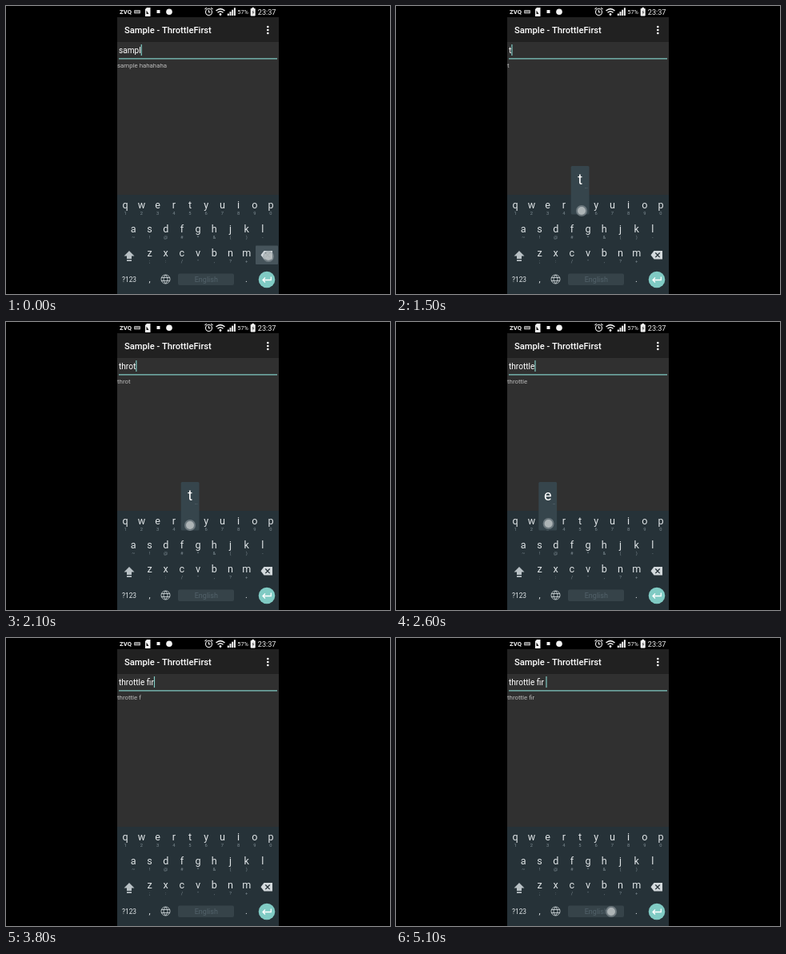
Write an HTML page with a canvas that moves like this. It is 480x360 px and loops after 5200 ms.

```html
<!DOCTYPE html>
<html lang="en">
<head>
<meta charset="utf-8">
<title>Throttled typing</title>
<style>
  html, body { margin: 0; width: 100%; height: 100%; overflow: hidden; background: #000; }
  canvas { display: block; }
</style>
</head>
<body>
<canvas id="stage" width="480" height="360"></canvas>
<script>
const ctx = document.getElementById('stage').getContext('2d');
const LOOP = 5200, STEP = 100, WINDOW = 500;
const TEAL = '#80cbc4', KEY = '#dfe4e6', HINT = '#7f8d94';

// [time, typed character, finger offset x, y]; '<' deletes
const edits = [
  [100, '<'], [200, '<'], [300, '<'], [400, '<'], [500, '<'],
  [1500, 't', 2, 7], [1700, 'h', 0, 5], [1800, 'r', 1, 5], [1900, 'o', 0, 5],
  [2100, 't', 0, 5], [2300, 't', 1, 5], [2400, 'l', -1, 5], [2600, 'e', 1, 3],
  [2900, ' ', 19, 0], [3300, 'f', -2, 5], [3500, 'i', 0, 5], [3700, 'r', 1, 5],
  [5100, ' ', 19, 0]
];

const keys = {};
[['qwertyuiop', '1234567890', 149.2, 249],
 ['asdfghjkl', '~!@#*&()-', 159.3, 279],
 ['zxcvbnm', ';:/",?+', 179.5, 309]].forEach(([letters, hints, x0, y]) =>
  [...letters].forEach((c, i) => keys[c] = { x: x0 + 20.2 * i, y, hint: hints[i] }));

function rect(x, y, w, h, color, radius = 0) {
  ctx.fillStyle = color;
  ctx.beginPath();
  ctx.roundRect(x, y, w, h, radius);
  ctx.fill();
}

function circle(x, y, r, color) {
  ctx.fillStyle = color;
  ctx.beginPath();
  ctx.arc(x, y, r, 0, 7);
  ctx.fill();
}

function text(s, x, y, size, color, align = 'left', weight = 400) {
  ctx.font = `${weight} ${size}px Roboto, sans-serif`;
  ctx.textAlign = align;
  ctx.fillStyle = color;
  ctx.fillText(s, x, y);
}

function path(d, color, width) {
  const p = new Path2D(d);
  if (width) {
    ctx.strokeStyle = color;
    ctx.lineWidth = width;
    ctx.stroke(p);
  } else {
    ctx.fillStyle = color;
    ctx.fill(p);
  }
}

function stateAt(t) {
  let input = 'sampl', output = 'sample hahahaha', last = -WINDOW;
  for (const [time, c] of edits) {
    if (time > t) break;
    input = c === '<' ? input.slice(0, -1) : input + c;
    if (time - last >= WINDOW) {
      output = input;
      last = time;
    }
  }
  return { input, output };
}

function statusBar() {
  const white = '#f4f4f4';
  text('ZVQ', 142, 10, 7.7, white, 'left', 700);
  rect(160, 5, 8, 4.5, '#aaa', 1);
  path('M161 6.6h6M161.5 8.2h5', '#222', 0.6);
  path('M176 2h4.5v11h-6.5v-9z', white);
  path('M175.5 5.5l3 4.5h-3z', '#111');
  rect(188.5, 5, 4, 4, white);
  circle(204, 7.2, 3.8, white);
  path('M257.5 7.5a4 4 0 1 1-8 0a4 4 0 1 1 8 0M253.5 5v2.7h2M248.5 4.2l2.2-2M258.5 4.2l-2.2-2', white, 1.1);
  path('M262.5 6q5.5-4.8 11 0M264.5 8.3q3.5-3 7 0', white, 1.5);
  circle(268, 10.5, 1.4, white);
  for (let i = 0; i < 4; i++) rect(276.8 + 2.7 * i, 9.5 - 2.4 * i, 2, 2.5 + 2.4 * i, white);
  text('57%', 289.3, 10, 7.4, white);
  rect(305.7, 3, 6, 9.5, white, 0.8);
  rect(307.5, 1.8, 2.4, 1.5, white);
  path('M309.5 4.2l-2 4h1.2l-.5 3 2.2-4h-1.3z', '#555');
  text('23:37', 314.8, 10.6, 9.1, white);
}

function keyboard(deleting) {
  rect(139, 236, 202, 124, '#263238');
  for (const [c, k] of Object.entries(keys)) {
    text(c, k.x, k.y + 4, 12.6, KEY, 'center');
    text(k.hint, k.x, k.y + 11.7, 5.8, HINT, 'center');
  }
  if (deleting) rect(312, 299.5, 28, 23.5, '#46545b', 1);
  path('M154 306l6.5 6.5h-3.5v3.5h-6v-3.5h-3.5zM151 317.3h6v1.7h-6z', '#b9c1c5');
  path('M318.5 311.3l4-5.3h10.5v10.6h-10.5z', '#d3d9dc');
  path('M324.3 308.5l5.4 5.6M329.7 308.5l-5.4 5.6', '#263238', 1.3);
  text('?123', 145, 345, 8.4, KEY);
  text(',', 179.5, 345, 11, KEY, 'center');
  text('.', 300.5, 345, 11, KEY, 'center');
  path('M205 341.5a5.5 5.5 0 1 1-11 0a5.5 5.5 0 1 1 11 0M194 339.5h11M194 343.5h11M199.5 336q-5 5.5 0 11q5-5.5 0-11', '#c6cdd0', 0.9);
  rect(215, 334.5, 70, 14.5, '#364349', 2);
  text('English', 250.3, 345.2, 9, '#53636b', 'center');
  circle(326, 342, 10.3, TEAL);
  path('M331.3 338.5v4h-10M324 339.5l-3 3 3 3', '#fff', 1.3);
}

function touchDot(x, y) {
  circle(x, y, 7, 'rgba(145,155,160,.6)');
  circle(x, y, 5, 'rgba(185,190,192,.85)');
}

function popup(c) {
  const { x, y } = keys[c], top = y - (y < 260 ? 49 : 46);
  rect(x - 11.3, top, 22.8, 60.5, '#36454c', 1.5);
  text(c, x + 0.2, top + 23, 18, '#fff', 'center');
  text('…', x + 7.8, top + 28, 5.5, '#82919a', 'center');
}

function draw(t) {
  const { input, output } = stateAt(t);
  const deleting = t < 600;
  rect(0, 0, 480, 360, '#000');
  statusBar();
  rect(139, 14, 202, 31, '#212121');
  text('Sample - ThrottleFirst', 148, 34, 11.2, '#fff', 'left', 500);
  for (const y of [26, 30, 34]) circle(327.3, y, 1.3, '#fff');

  rect(139, 45, 202, 191, '#303030');
  rect(141, 65.3, 198, 1.3, TEAL);
  text(input, 141, 59, 10.1, '#fff');
  const cursorHidden = (t >= 1000 && t < 1200) || (t >= 4400 && t < 4800);
  if (!cursorHidden) rect(141 + ctx.measureText(input).width, 48, 1.2, 14, TEAL);
  text(output, 139, 77.3, 7.86, '#bcbcbc');

  keyboard(deleting);
  if (deleting) touchDot(328, 313);
  const press = edits.findLast(([time, c]) => c !== '<' && t >= time - STEP && t < time + STEP);
  if (press) {
    const [, c, dx, dy] = press;
    const { x, y } = keys[c] || { x: 250, y: 342 };
    if (keys[c]) popup(c);
    touchDot(x + dx, y + dy);
  }
}

function tick() {
  const t = performance.now() % LOOP;
  draw(Math.floor(t / STEP) * STEP);
  requestAnimationFrame(tick);
}
tick();
</script>
</body>
</html>
```
